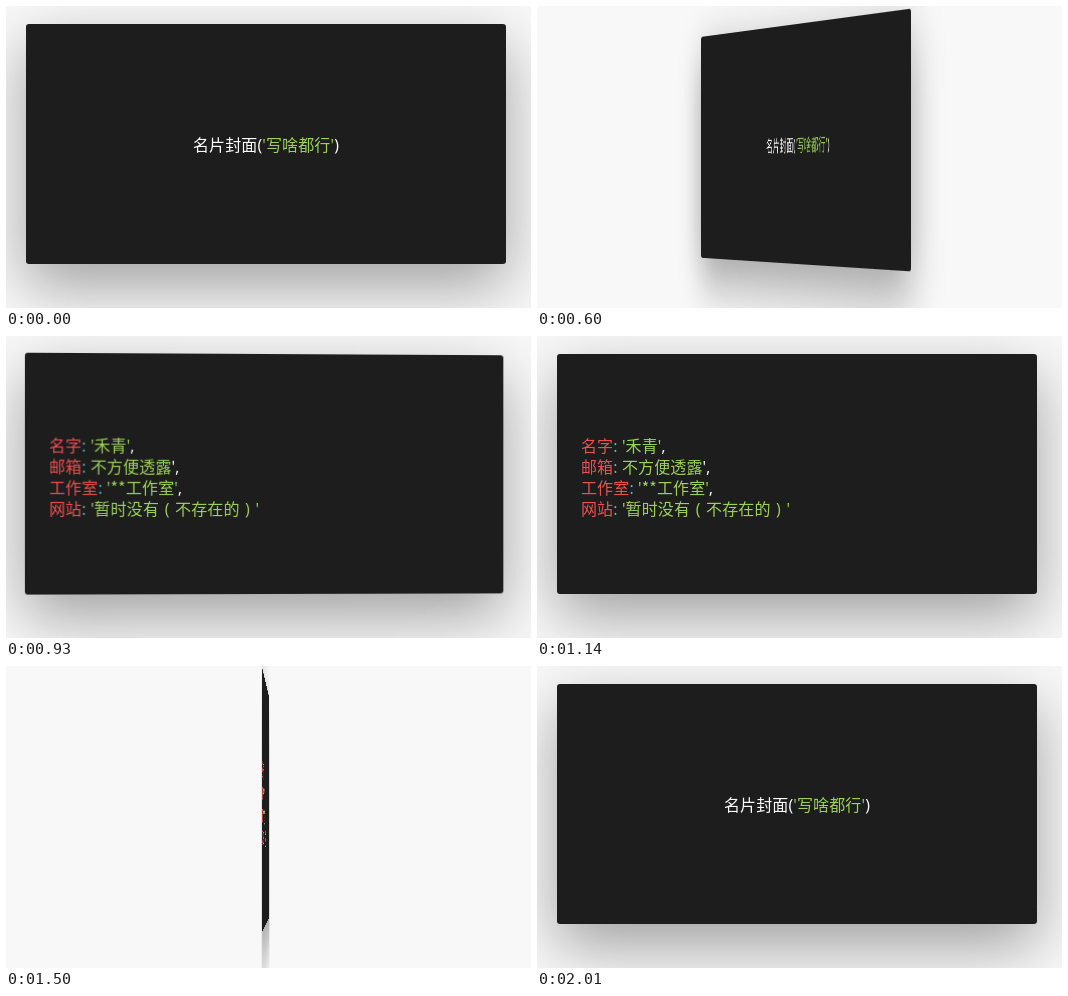
Animation of 525 by 302 pixels, one loop 3.06 s. Source, as an HTML page:

```html
<!DOCTYPE html>
<html lang="zh-CN">
<head>
<meta charset="utf-8">
<title>名片</title>
<style>
html, body {
  margin: 0;
  width: 100%;
  height: 100%;
  overflow: hidden;
  background: #f8f8f8;
}
.stage {
  position: relative;
  width: 525px;
  height: 302px;
  overflow: hidden;
  perspective: 2500px;
  perspective-origin: 260px 180px;
}
.card {
  position: absolute;
  left: 20px;
  top: 18px;
  width: 480px;
  height: 240px;
  transform-style: preserve-3d;
}
.face {
  position: absolute;
  inset: 0;
  box-sizing: border-box;
  border-radius: 3px;
  background: #1d1d1d;
  box-shadow: 0 22px 62px rgba(0, 0, 0, .36);
  color: #fff;
  font: 16px/21px "Open Sans", "Noto Sans CJK SC", "Noto Sans CJK", sans-serif;
  letter-spacing: .12px;
  white-space: nowrap;
  backface-visibility: hidden;
}
.front { padding-top: 111px; text-align: center; }
.back { padding: 82px 0 0 24px; transform: rotateY(180deg); }
.key { color: #ee4f4f; }
.colon { color: #4fc1d0; }
.value { color: #9cd25a; }
.stars { font-family: "Noto Sans CJK SC", "Noto Sans CJK", sans-serif; line-height: 0; }
.paren { display: inline-block; width: 1em; text-align: center; }
</style>
</head>
<body>
<div class="stage">
  <div class="card" id="card">
    <div class="face front">名片封面(<span class="value">'写啥都行'</span>)</div>
    <div class="face back">
      <div><span class="key">名字</span><span class="colon">:</span> <span class="value">'禾青'</span>,</div>
      <div><span class="key">邮箱</span><span class="colon">:</span> <span class="value">不方便透露</span>',</div>
      <div><span class="key">工作室</span><span class="colon">:</span> <span class="value">'<span class="stars">**</span>工作室'</span>,</div>
      <div><span class="key">网站</span><span class="colon">:</span> <span class="value">'暂时没有<span class="paren">(</span>不存在的<span class="paren">)</span>'</span></div>
    </div>
  </div>
</div>
<script>
const LOOP = 3060;

// [time in ms, angle in degrees, easing towards the next step]
const steps = [
  [0, 0, 'linear'],
  [447, 0, 'cubic-bezier(.4, 0, 0, 1)'],
  [1094, -180, 'linear'],
  [1367, -180, 'cubic-bezier(.23, 0, 0, 1)'],
  [2007, 0, 'linear'],
  [LOOP, 0, 'linear'],
];

document.getElementById('card').animate(
  steps.map(([time, angle, easing]) => ({
    offset: time / LOOP,
    transform: `rotateY(${angle}deg)`,
    easing,
  })),
  { duration: LOOP, iterations: Infinity }
);
</script>
</body>
</html>
```
